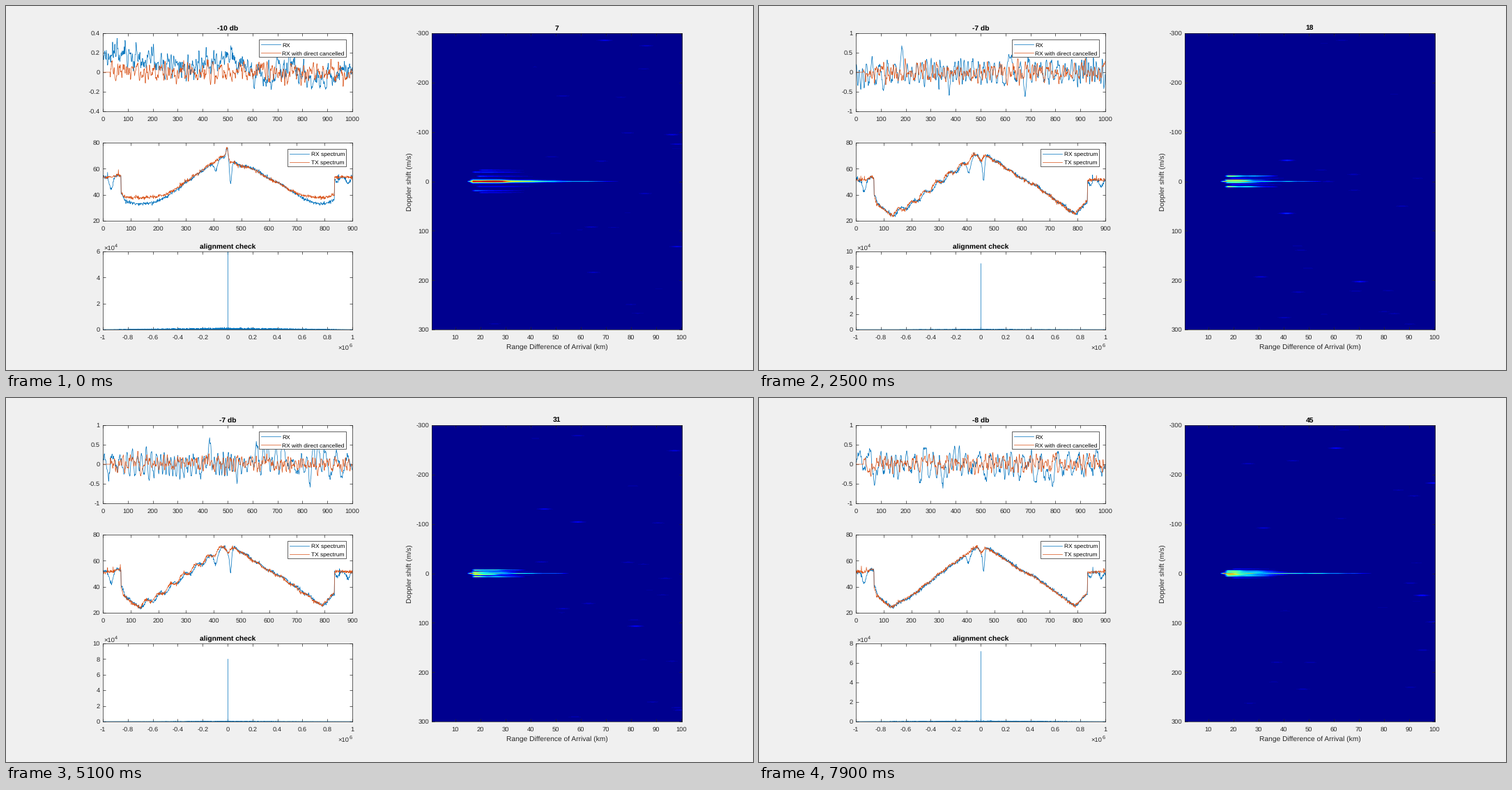
A matplotlib script for the animation above (8 s loop, 1072 by 522 pixels).

```python
import matplotlib.pyplot as plt
import numpy as np
from matplotlib.animation import FuncAnimation
from matplotlib.colors import LinearSegmentedColormap
from matplotlib.lines import Line2D
from matplotlib.patches import Rectangle

W, H = 1072, 522
BLUE, ORANGE, INK = "#0072BD", "#D95319", "#262626"
TICK, LABEL, SMALL = 9.33, 10.27, 8.4  # font sizes in pixels

plt.rcParams["font.family"] = "Liberation Sans"
plt.rcParams["axes.unicode_minus"] = False
plt.rcParams["text.hinting"] = "none"

JET = LinearSegmentedColormap.from_list("jet64", [
    (0, "#00008f"), (.11, "#0000ff"), (.365, "#00ffff"),
    (.62, "#ffff00"), (.873, "#ff0000"), (1, "#800000")], N=64)

# Key points (x, value), joined by straight lines.
GAIN = [(7, -10), (10, -7), (18, -7), (23, -6), (31, -7), (37, -5), (45, -8)]
PEAK = [(10, 5.98), (18, 8.5), (31, 8.03), (45, 7.25)]
SPREAD = [(7, 1), (10, 0), (37, 0), (45, 1)]
TREND = [(0, .24), (180, .15), (330, .03), (510, .2), (650, -.08),
         (750, .1), (880, -.14), (1000, .06)]
BAND = [(66, 40), (75, 33), (125, 24.5), (200, 33), (300, 50), (437, 71), (480, 69),
        (600, 52), (640, 48), (790, 25), (835, 36)]

T = np.arange(1000)
BINS = np.arange(901)
LAG = np.linspace(-1, 1, 1401)
RANGE = np.linspace(.6, 100.3, 359)
DOPPLER = np.linspace(-300, 300, 425)


def curve(points, x):
    return np.interp(x, *zip(*points))


def bell(x, center, width):
    return np.exp(-((x - center) / width) ** 2)


def smooth(rng, width, size=1000):
    """Noise of unit deviation, smoothed over a window."""
    kernel = np.hanning(width + 2)
    noise = np.convolve(rng.normal(size=size + width + 2), kernel, "same")[:size]
    return noise / noise.std()


def signals(n, rng):
    if n == 7:
        rx = curve(TREND, T) + .05 * smooth(rng, 10) + .04 * smooth(rng, 3)
        clean = .045 * smooth(rng, 8) + .02 * smooth(rng, 2)
    else:
        rate = np.exp(.4 * smooth(rng, 150))
        phase = np.cumsum(2 * np.pi * rate / (14 + .5 * (n - 10)))
        rx = .24 * np.sin(phase) + .08 * smooth(rng, 16) + .05 * smooth(rng, 3)
        for _ in range(8):
            rx += rng.choice([-.3, .3]) * bell(T, rng.uniform(0, 1000), rng.uniform(7, 13))
        rx = np.clip(rx, -.72, .68)
        level = .13 + .07 * np.exp((10 - n) / 5)
        clean = level * (.75 * smooth(rng, 9) + .4 * smooth(rng, 3))
    return rx, np.where(T < 30, 0, clean)


def spectrum(received, loud, spread, rng):
    edge = (BINS < 66) | (BINS > 835)
    lag = 8 * received
    hill = curve(BAND, BINS - lag / 2)
    ripple = (1.9 - 1.5 * spread) * (.3 + .7 * (BINS < 430)) * ((BINS > 130) & (BINS < 790))
    hill = hill + ripple * np.sin(2 * np.pi * (BINS - 277 - lag) / 45)
    hill -= 4 * bell(BINS, 452, 9) + 5 * loud * bell(BINS, 485, 40)
    y = np.where(edge, 51.5 + 2 * loud + 2 * bell(BINS, 55, 12), hill)
    if received:
        for x, depth, width in [(30, 9, 9), (407, 7, 8), (461, 17, 5),
                                (846, 4, 8), (885, 5, 9)]:
            y -= depth * bell(BINS, x, width)
    y += 11 * loud * bell(BINS, 449, 6)
    # A noise floor adds to the signal in power.
    floor = (32 if received else 37.5) * loud
    y = 10 * np.log10(10 ** (y / 10) + 10 ** (floor / 10))
    spikes = (rng.random(901) > .985) * rng.uniform(1, 5, 901) * edge
    return y + rng.normal(0, .65, 901) + spikes


def correlation(loud, spread, rng):
    level = .06 + .03 * spread + .08 * loud
    y = np.abs(rng.normal(.6, .2, LAG.size)) * level * (1 - np.abs(LAG))
    y[::2] = 0
    return y


def streak(start, end, y, amp, rng, width=1.0, fall=.6):
    """A horizontal echo that rises fast and fades along the range."""
    fade = np.clip((end - RANGE) / (end - start), 0, 1) ** fall
    along = np.clip((RANGE - start) / 1.5, 0, 1) * fade
    along = along * (1 + .12 * smooth(rng, 30, RANGE.size))
    size = width * (.45 + .55 * fade)
    return amp * along * np.exp(-.5 * ((DOPPLER[:, None] - y) / size) ** 2)


def doppler_map(n, loud, spread, rng):
    side = 4 + 12 * np.exp(-(n - 10) / 14)
    dim = 1 - .6 * loud
    parts = [streak(14.5, 55 + 20 * spread, 0, .6, rng, .9),
             streak(15.5, 58, 0, 1.05 * loud, rng, 2.2, .8)]
    for sign in (-1, 1):
        parts += [
            streak(16.3, 38, sign * side, .58 * dim, rng),
            streak(16, 35 + 7 * spread, sign * 2.3, .68 * dim, rng),
            streak(18, 42, sign * (side / 2 + 1), .16, rng),
            streak(19, 38, sign * (side + 4), .12 * spread, rng)]
    z = np.maximum.reduce(parts)
    for i in range(24):
        x = 100 - 75 * rng.random() ** 1.4
        y = rng.uniform(-295, 295)
        amp = rng.uniform(.08, .18) if i < 4 else rng.uniform(.02, .07)
        z = np.maximum(z, amp * bell(DOPPLER[:, None], y, 1.5) * bell(RANGE, x, 2.4))
    return z


fig = plt.figure(figsize=(W / 72, H / 72), dpi=72, facecolor="#f0f0f0")


def label(x, y, text, size=LABEL, **kw):
    kw = {"ha": "left", "va": "baseline", "color": INK, **kw}
    fig.text(x / W, 1 - y / H, text, fontsize=size, **kw)


def panel(x, y, w, h, xlim, xticks):
    ax = fig.add_axes([x / W, 1 - (y + h) / H, w / W, h / H])
    ax.set_xlim(*xlim)
    ax.set_xticks(xticks)
    ax.tick_params(direction="in", top=True, right=True, length=3.6, width=.7,
                   color=INK, labelcolor=INK, labelsize=TICK)
    ax.tick_params(axis="x", pad=7)
    ax.tick_params(axis="y", pad=4)
    ax.xaxis.set_major_formatter("{x:g}")
    ax.yaxis.set_major_formatter("{x:g}")
    for spine in ax.spines.values():
        spine.set(linewidth=.7, color=INK)
    return ax


def traces(ax, x, *colors):
    return [ax.plot(x, np.zeros(len(x)), color=c, lw=.7)[0] for c in colors]


def heading(ax, text=""):
    return ax.set_title(text, fontsize=LABEL, fontweight="bold", color="black", pad=4.3)


def legend(x, y, w, names):
    fig.add_artist(Rectangle((x / W, 1 - (y + 25) / H), w / W, 25 / H, lw=.7,
                             facecolor="white", edgecolor=INK, transform=fig.transFigure))
    for i, (name, color) in enumerate(zip(names, (BLUE, ORANGE))):
        row = y + 7 + 11.7 * i
        fig.add_artist(Line2D([(x + 3) / W, (x + 31) / W], [1 - row / H] * 2,
                              color=color, lw=.7, transform=fig.transFigure))
        label(x + 33.5, row + 3.8, name, SMALL, color="black")


def power(x, y, exponent):
    label(x, y, "×10", TICK)
    label(x + 16.3, y - 4, exponent, 7.4)


def set_y(ax, low, high, count):
    ax.set_ylim(low, high)
    ax.set_yticks(np.linspace(low, high, count))


time_ax = panel(139, 39, 358, 112, (0, 1000), range(0, 1001, 100))
spec_ax = panel(139, 196, 358, 112, (0, 900), range(0, 901, 100))
corr_ax = panel(139, 352, 358, 112, (-1, 1), np.linspace(-1, 1, 11))
map_ax = panel(611, 39, 359, 425, (.6, 100.3), range(10, 101, 10))

rx_line, clean_line = traces(time_ax, T, BLUE, ORANGE)
rx_spec, tx_spec = traces(spec_ax, BINS, BLUE, ORANGE)
corr_line, = traces(corr_ax, LAG, BLUE)
spike, = traces(corr_ax, [0, 0], BLUE)
image = map_ax.imshow(np.zeros((425, 359)), cmap=JET, vmin=0, vmax=1, aspect="auto",
                      interpolation="nearest", extent=(.6, 100.3, 300, -300))
map_ax.set_facecolor(JET(0))
map_ax.set_yticks(range(-300, 301, 100))
set_y(spec_ax, 20, 80, 4)

db_title, scan_title = heading(time_ax), heading(map_ax)
heading(corr_ax, "alignment check")
label(791, 491.5, "Range Difference of Arrival (km)", ha="center")
label(579.5, 252, "Doppler shift (m/s)", ha="center", va="center", rotation=90)
power(140, 349.5, "4")
power(476.5, 493.3, "6")
legend(363, 48, 125, ("RX", "RX with direct cancelled"))
legend(404, 205, 84, ("RX spectrum", "TX spectrum"))


def update(frame):
    ms = frame * 100
    n = 7 if ms < 500 else 8 + (ms - 500) // 200
    rng = np.random.default_rng(n)
    loud = max(0, (10 - n) / 3)
    spread = curve(SPREAD, n)
    peak = curve(PEAK, n)

    rx, clean = signals(n, rng)
    rx_line.set_ydata(rx)
    clean_line.set_ydata(clean)
    limit = .4 if n == 7 else 1
    set_y(time_ax, -limit, limit, 5)

    rx_spec.set_ydata(spectrum(True, loud, spread, rng))
    tx_spec.set_ydata(spectrum(False, loud, spread, rng))

    corr_line.set_ydata(correlation(loud, spread, rng))
    spike.set_ydata([0, peak])
    steps = int(np.ceil(peak / 2))
    set_y(corr_ax, 0, 2 * steps, steps + 1)

    image.set_data(doppler_map(n, loud, spread, rng))
    db_title.set_text(f"{round(curve(GAIN, n))} db")
    scan_title.set_text(str(n))


anim = FuncAnimation(fig, update, frames=80, interval=100, repeat=True,
                     repeat_delay=0, cache_frame_data=False)
plt.show()
```
